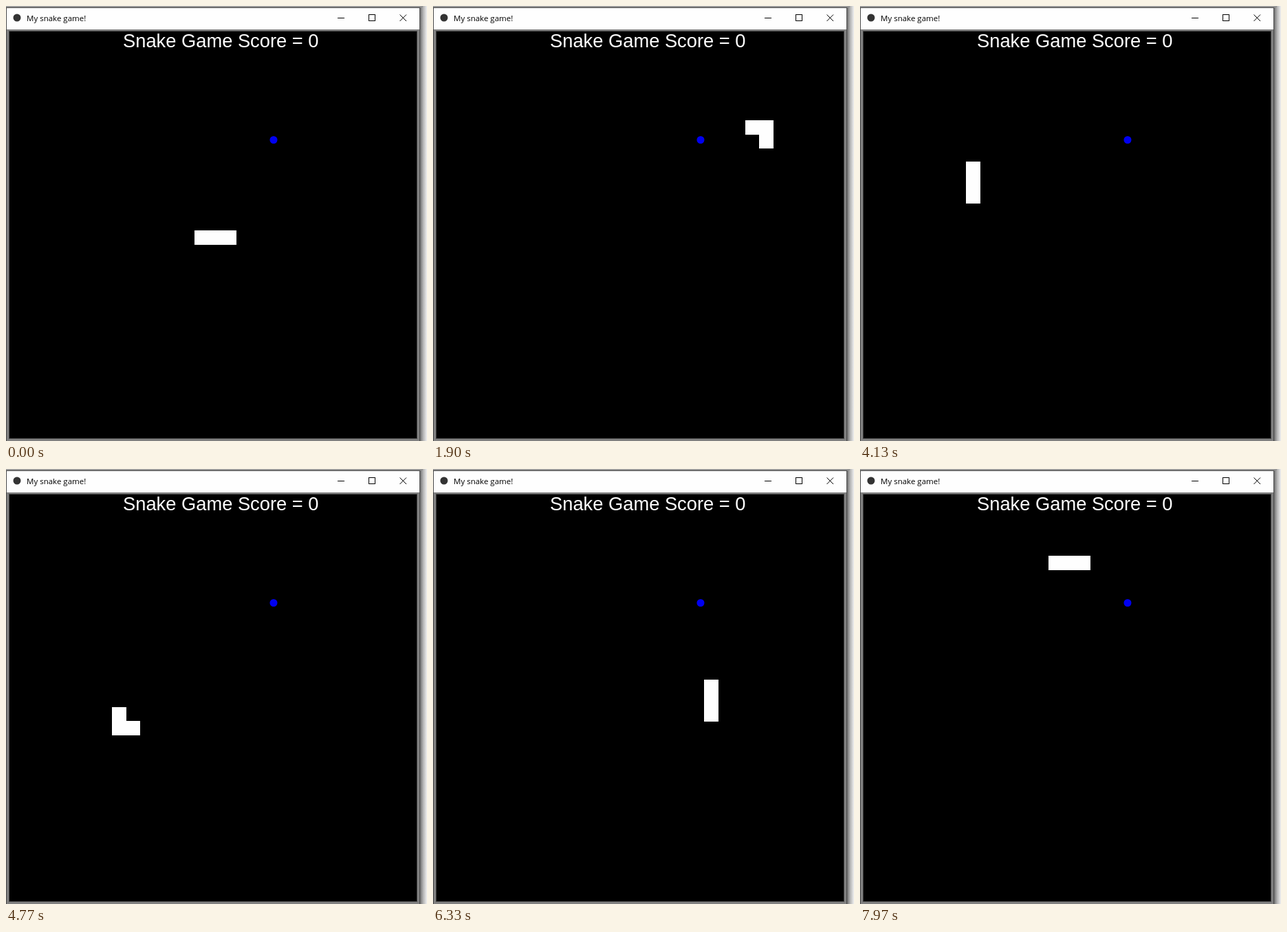
An HTML page for the animation above (8000 ms loop, 612 by 632 pixels).

```html
<!DOCTYPE html>
<html lang="en">
<head>
<meta charset="utf-8">
<title>My snake game!</title>
<style>
  html, body { margin: 0; width: 100%; height: 100%; overflow: hidden; background: #eee; }
  svg { display: block; width: 612px; height: 632px; }
  .title { font: 11.5px "Open Sans", "Noto Sans", sans-serif; fill: #000; }
  .score { font: 27.3px "Liberation Sans", Arial, sans-serif; fill: #fff; }
  .buttons { fill: none; stroke: #000; }
  .snake { fill: #fefefe; }
</style>
</head>
<body>
<svg viewBox="0 0 612 632">
  <defs>
    <linearGradient id="shadow">
      <stop offset="0" stop-color="#606060"/>
      <stop offset=".5" stop-color="#b4b4b4"/>
      <stop offset="1" stop-color="#f0f0f0"/>
    </linearGradient>
  </defs>

  <rect x="601" width="11" height="632" fill="url(#shadow)"/>
  <rect width="606" height="2" fill="#969696"/>
  <rect y="2" width="602" height="630" fill="#484848"/>
  <rect x="1" y="3" width="600" height="31" fill="#fefefe"/>

  <rect x="1" y="34" width="600" height="598" fill="#808080"/>
  <rect x="4" y="36" width="594" height="593" fill="#505050"/>
  <rect x="5" y="37" width="592" height="591" fill="#000"/>

  <circle cx="16" cy="17" r="5.5" fill="#333"/>
  <text class="title" x="30" y="21.5">My snake game!</text>
  <g class="buttons">
    <path d="M482 17.5h10M527.5 12.5h9v9h-9z" shape-rendering="crispEdges"/>
    <path d="M572.5 12.5l9.5 9.5M582 12.5l-9.5 9.5"/>
  </g>

  <text class="score" x="170" y="60">Snake Game Score = 0</text>
  <circle cx="389" cy="194.5" r="5.5" fill="#0000f0"/>
  <g class="snake">
    <rect width="21" height="21"/>
    <rect width="21" height="21"/>
    <rect width="21" height="21"/>
  </g>
</svg>
<script>
  const LOOP = 8000, CELL = 20;
  const DIRS = { R: [1, 0], L: [-1, 0], U: [0, -1], D: [0, 1] };
  const segments = document.querySelectorAll('.snake rect');

  // Every cell the head visits, beginning with the resting body.
  const cells = [[274, 326]];
  for (const run of 'R10 U8 L16 D10 R12 U12 L6'.split(' ')) {
    const [dx, dy] = DIRS[run[0]];
    for (let i = +run.slice(1); i > 0; i--) {
      const [x, y] = cells[cells.length - 1];
      cells.push([x + dx * CELL, y + dy * CELL]);
    }
  }
  const lastMove = cells.length - segments.length;

  // Nine moves a second, in a slightly uneven rhythm.
  const BEATS = [0, 67, 200, 300, 467, 533, 667, 800, 867];
  const moveTime = n =>
    1000 * Math.floor((n + 3) / 9) + BEATS[(n + 3) % 9] - 340;

  function draw(t) {
    let move = 0;
    while (move < lastMove && moveTime(move + 1) <= t) move++;
    segments.forEach((seg, i) => {
      const [x, y] = cells[move + i];
      seg.setAttribute('x', x);
      seg.setAttribute('y', y);
    });
  }

  const start = performance.now();
  function tick() {
    draw((performance.now() - start) % LOOP);
    requestAnimationFrame(tick);
  }
  tick();
</script>
</body>
</html>
```
